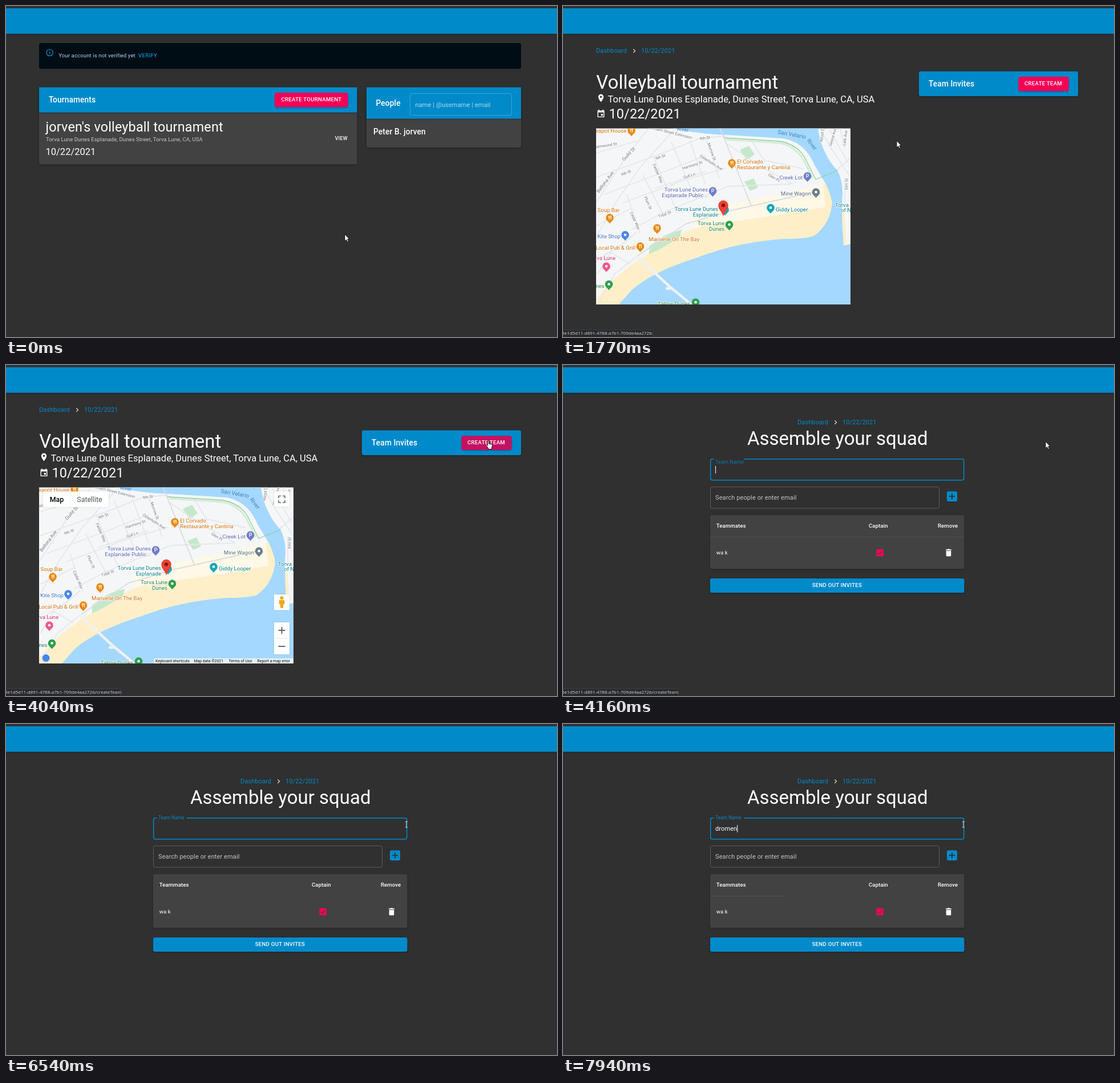
An HTML page for the animation above (8000 ms loop, 966 by 580 pixels).

```html
<!DOCTYPE html>
<html lang="en">
<head>
<meta charset="utf-8">
<title>Tournament team setup</title>
<style>
html, body { margin: 0; width: 100%; height: 100%; overflow: hidden; background: #303030; }
svg { display: block; font-family: Roboto, sans-serif; fill: #fff; }
.h3 { font-size: 33px; }
.h4 { font-size: 23.4px; letter-spacing: .007em; }
.h5 { font-size: 16.5px; }
.h6 { font-size: 13.75px; font-weight: 500; letter-spacing: .0075em; }
.b1 { font-size: 11px; letter-spacing: .0094em; }
.b2 { font-size: 9.625px; letter-spacing: .0107em; }
.btn { font-size: 9.625px; font-weight: 500; letter-spacing: .0286em; }
.th { font-size: 9.625px; font-weight: 500; letter-spacing: .01em; }
.blue { fill: #008aca; }
.pink { fill: #f50057; }
.paper { fill: #424242; }
.lift { filter: drop-shadow(0 1.5px 1.5px rgba(0,0,0,.32)); }
.soft { filter: drop-shadow(0 .5px 1px rgba(0,0,0,.15)); }
.line { fill: none; stroke: #5c5c5c; }
.tiny { font-size: 6.9px; fill: #111; }
#status text { font: 8px "Open Sans", "Noto Sans", sans-serif; fill: #d3d6da; }
#labels text { paint-order: stroke; stroke: #fff; stroke-width: 1.6px; stroke-linejoin: round; }
#labels .water { stroke: none; fill: #3f86b8; }
</style>
</head>
<body>
<svg width="966" height="580" viewBox="0 0 966 580">
  <defs>
    <clipPath id="frame"><rect x="58" y="214.5" width="446" height="308.5"/></clipPath>
    <path id="pin" d="M0 10.5C-1.5 7-6.8 5.5-6.8 0A6.8 6.8 0 0 1 6.8 0C6.8 5.5 1.5 7 0 10.5Z"/>
    <path id="chevron" d="M-1.7-3.2L1.6 0L-1.7 3.2" fill="none" stroke="#ddd" stroke-width="1.2"/>
  </defs>
  <rect width="966" height="580" fill="#303030"/>
  <rect class="blue lift" y="4" width="966" height="44.7"/>
  <rect width="966" height="4" fill="#323236"/>

  <g id="home">
    <rect x="58" y="65" width="845" height="45" rx="3" fill="#000d14"/>
    <circle cx="76.6" cy="81.7" r="5.7" fill="none" stroke="#1a8fdc" stroke-width="1.2"/>
    <path d="M76.6 78.2v1.4M76.6 80.8v4" stroke="#1a8fdc" stroke-width="1.3"/>
    <text class="b2" x="92.2" y="90" fill="#a6d5fa">Your account is not verified yet</text>
    <text class="btn blue" x="232" y="90">VERIFY</text>

    <rect class="paper lift" x="58" y="142.5" width="557.5" height="135" rx="3"/>
    <path class="blue lift" d="M58 186.5v-44h557.5v44z"/>
    <text class="h6" x="75" y="169">Tournaments</text>
    <rect class="pink lift" x="471" y="152" width="128.5" height="25" rx="3"/>
    <text class="btn" x="482.5" y="167">CREATE TOURNAMENT</text>
    <text class="h4" x="69.5" y="220">jorven's volleyball tournament</text>
    <text class="b2" x="70" y="236.5" fill="#c9c9c9" style="letter-spacing:.004em">Torva Lune Dunes Esplanade, Dunes Street, Torva Lune, CA, USA</text>
    <text class="h5" x="69.5" y="261">10/22/2021</text>
    <rect id="hover" x="565.5" y="221" width="44" height="21.5" rx="3" fill="#515151"/>
    <text class="btn" x="576.7" y="234.6" style="font-size:8.94px">VIEW</text>

    <rect class="paper lift" x="632" y="142.5" width="271" height="105.5" rx="3"/>
    <path class="blue lift" d="M632 197.5v-55h271v55z"/>
    <text class="h6" x="648.5" y="175">People</text>
    <rect class="line" x="708.5" y="153.5" width="178" height="38" rx="3" style="stroke:#3fa6d8"/>
    <text class="b1" x="717.5" y="176.5" fill="#b0d9ee">name | @username | email</text>
    <text class="h6" x="644" y="225">Peter B. jorven</text>
  </g>

  <g id="event">
    <text class="b1 blue" x="58" y="82">Dashboard</text>
    <use href="#chevron" x="125" y="78.7"/>
    <text class="b1 blue" x="137" y="82">10/22/2021</text>
    <text class="h3" x="58.3" y="145.3">Volleyball tournament</text>
    <path fill-rule="evenodd" d="M66.5 168.3C64.5 165.5 61.8 162.3 61.8 159.2a4.7 4.7 0 0 1 9.4 0C71.2 162.3 68.5 165.5 66.5 168.3ZM66.5 157.5a1.7 1.7 0 1 0 .01 0Z"/>
    <text class="h5" x="78.5" y="169.3">Torva Lune Dunes Esplanade, Dunes Street, Torva Lune, CA, USA</text>
    <path fill-rule="evenodd" d="M60.5 183h1.5v-1.6h1.5v1.6h6v-1.6h1.5v1.6h1.5v12h-12zM61.9 186.4v7.3h9.2v-7.3zM66.7 189h3.2v3.2h-3.2z"/>
    <text class="h4" x="80.5" y="196.8">10/22/2021</text>
    <rect class="blue lift" x="624" y="114.5" width="279" height="43.5" rx="3"/>
    <text class="h6" x="641" y="141">Team Invites</text>
    <rect id="create" class="lift" x="798.5" y="124" width="88" height="25" rx="3"/>
    <text class="btn" x="809" y="139.4">CREATE TEAM</text>

    <g clip-path="url(#frame)">
      <rect x="58" y="214" width="446" height="310" fill="#f5f6f7"/>
      <path fill="#feefc9" d="M58 516Q78 482 132 446L190 408Q225 386 290 378L455 352L452 315L474 300V410L100 523H58ZM489 360L494 366L497 419H489Z"/>
      <path fill="#fef8e7" d="M222 372L300 346L400 326L456 312L460 352L380 366L290 379L228 388Z"/>
      <path fill="#c5e8ca" d="M151 421L180 401L208 392L205 405L168 427L151 435ZM310 252L326 245L336 260L322 270ZM318 308L334 302L342 318L328 324Z"/>
      <path fill="#a5d8ff" d="M190 214Q240 225 290 226L385 232Q424 238 441 279L456 304Q466 318 472 344Q469 382 440 403Q424 408 389 408C340 411 290 420 235 441Q160 464 121 497L98 523H504V417L492 420Q487 360 490 330Q490 302 480 287C462 268 450 240 447 214Z"/>
      <g fill="none" stroke="#e4e7ed" stroke-width="1.8">
        <path d="M58 345L108 268L150 214M58 405L92 345L135 283L190 222M58 300Q150 268 240 232L285 228M72 330Q160 298 250 262M58 258L130 236M105 345L210 306L285 284M120 392L175 362L290 316L400 312M160 320L250 290M58 445Q105 420 130 395M58 385L120 355M62 523L90 470L130 438L215 382L300 357L440 326M112 330L135 398M140 296L178 370M158 262L196 352M190 238L225 322M222 236L250 312M250 230L274 302M275 214L286 240L330 350M285 240L345 280L402 312M330 235L352 270L420 285M60 470L84 432L118 452M480 287L504 266M450 214L472 252L504 300M466 214L500 275M486 214L494 250M494 300V350"/>
        <path stroke="#ced3dc" stroke-width="1" d="M130 438L215 382L300 357L440 326M275 214L286 240L330 350"/>
        <path stroke="#f0f1f3" stroke-width="4.5" d="M128 437L185 490L225 523M180 495h12"/>
        <path stroke="#d3ecd7" stroke-width="3" d="M286 234L380 240Q410 246 424 274L438 302"/>
        <path stroke="#8fd09d" stroke-width="1.3" d="M283 231L380 237Q415 243 428 274L443 304L482 288"/>
      </g>
      <g id="pins"></g>
      <g id="labels"></g>
      <path fill="#ea4335" d="M281 369C279.5 361 272.3 357.5 272.3 349.3a8.7 8.7 0 0 1 17.4 0C289.7 357.5 282.5 361 281 369Z"/>
      <circle cx="281" cy="349.2" r="3.2" fill="#8b1710"/>
      <g id="controls">
        <path class="soft" d="M65 221.5h115v27.5h-115zM470 221.5h27v27h-27zM470 402h27v27.5h-27zM470 451h27v56h-27z"/>
        <path d="M113 222v27" stroke="#eee"/>
        <text x="76.7" y="239.5" font-size="12.4" font-weight="500" fill="#000">Map</text>
        <text x="124.3" y="239.5" font-size="12.4" fill="#565656">Satellite</text>
        <path fill="none" stroke="#666" stroke-width="1.6" d="M478 233.5v-4h4M485 229.5h4v4M489 237v4h-4M482 241h-4v-4"/>
        <path stroke="#666" stroke-width="2" d="M477.5 465h12M483.5 459v12M477.5 493h12"/>
        <path d="M474 479h19" stroke="#e6e6e6"/>
        <circle cx="483.5" cy="408.3" r="3" fill="#f2a51f"/>
        <path fill="#f2a51f" d="M479 412h9l.5 7h-2l-.7 7h-4.6l-.7-7h-2z"/>
        <circle cx="70" cy="513.5" r="6.5" fill="#4285f4"/>
        <path fill="#f5f5f5" opacity=".8" d="M259 514h245v9H259z"/>
        <text class="tiny" x="262" y="520.5">Keyboard shortcuts</text>
        <text class="tiny" x="329.5" y="520.5">Map data ©2021</text>
        <text class="tiny" x="390.5" y="520.5">Terms of Use</text>
        <text class="tiny" x="440.5" y="520.5">Report a map error</text>
      </g>
    </g>
  </g>

  <g id="team">
    <text class="b1 blue" x="411" y="104">Dashboard</text>
    <use href="#chevron" x="478" y="100.5"/>
    <text class="b1 blue" x="490" y="104">10/22/2021</text>
    <text class="h3" x="323" y="140">Assemble your squad</text>
    <rect class="line" x="258.7" y="164.7" width="444" height="37" rx="3" style="stroke:#008aca;stroke-width:1.5"/>
    <path d="M264.5 162h52.5v5h-52.5z" fill="#303030"/>
    <text id="label" class="blue" x="267" letter-spacing=".1">Team Name</text>
    <text id="typed" class="b1" x="267" y="187"></text>
    <rect id="caret" y="177" width="1" height="13"/>
    <rect class="line" x="258.5" y="213.5" width="401" height="37.5" rx="3"/>
    <text class="b1" x="267" y="236" fill="#c3c3c3">Search people or enter email</text>
    <rect class="blue" x="673" y="221.5" width="18" height="17.5" rx="2"/>
    <path d="M677 230.2h10M682 225.2v10" stroke="#303030" stroke-width="1.9"/>
    <rect class="paper lift" x="258" y="263" width="445.5" height="94.3" rx="3"/>
    <rect id="divider" x="258" y="301" height="1" fill="#515151"/>
    <text class="th" x="268.7" y="284.5">Teammates</text>
    <text class="th" x="536" y="284.5">Captain</text>
    <text class="th" x="657" y="284.5">Remove</text>
    <text class="b2" x="268.7" y="332">wa k</text>
    <rect class="pink" x="549.5" y="322.8" width="12.5" height="12.5" rx="1.5"/>
    <path d="M552 329.2l2.6 2.6 5-5.2" fill="none" stroke="#424242" stroke-width="1.3"/>
    <path d="M671 323.2h2.7l.8-.9h3l.8.9h2.7v1.5h-10zM671.7 325.7h8.6v8.3q0 1.3-1.3 1.3h-6q-1.3 0-1.3-1.3z"/>
    <rect class="blue lift" x="258" y="374" width="445.5" height="25" rx="3"/>
    <text class="btn" x="436.7" y="388.7">SEND OUT INVITES</text>
  </g>

  <g id="status">
    <path id="statusBox" fill="#292a2d" stroke="#3d3e41"/>
    <text id="url" x="-2" y="576"></text>
  </g>
  <g id="cursor" stroke="#000" stroke-linejoin="round">
    <path id="arrow" stroke-width=".8" d="M0 0V12l2.7-2.5 1.9 4 1.9-.9-1.9-3.9H8Z"/>
    <path id="hand" stroke-width=".9" d="M-1.5-1.5q1.2-1.2 2.2.2V4l4.7 1q1.5.6 1.2 2.2L5.6 11v2.5H-.5V11.5L-4.5 7q-.4-1.6 1.3-1.3l1.7 1.5Z"/>
    <path id="beam" fill="none" stroke="#ddd" d="M-2-5H2M0-5V5M-2 5H2"/>
  </g>
</svg>
<script>
const LOOP = 8000;
const $ = id => document.getElementById(id);
const show = (id, on) => { $(id).style.display = on ? '' : 'none'; };
const set = (id, attrs) => { for (const k in attrs) $(id).setAttribute(k, attrs[k]); };

const pinColor = { food: '#e8890c', lot: '#6f7cc9', shop: '#4a86ea', sight: '#12a5b8', park: '#2f9e4f', grey: '#6b7f89', stay: '#f0588f' };
const textColor = { food: '#d06c08', lot: '#5661b5', shop: '#3b70d8', sight: '#087f8c', park: '#228043', grey: '#5a6e7a', stay: '#d8276b' };
const fork = '<path d="M-2-3.5v2.5q0 1 1 1v3.5M-.2-3.5v2.5q0 1-.8 1M2-3.5v7M2-3.5q-1.2 1.5 0 4" fill="none" stroke="#fff"/>';
const dot = '<circle r="2.3"/>';
const glyphs = { food: fork, lot: '<text y="3.2" font-size="9" font-weight="500" text-anchor="middle">P</text>' };
const pins = [
  [296, 275, 'food'], [82, 371, 'food'], [165, 389, 'food'], [135.5, 421, 'food'], [120, 218, 'food'],
  [262.5, 324, 'lot'], [428.5, 298, 'lot'], [109, 401, 'shop'], [443.5, 326, 'grey'], [364, 353.5, 'sight'],
  [284, 357, 'sight'], [291.5, 383, 'park'], [80.5, 487.5, 'park'], [232.5, 519, 'park'], [76, 456, 'stay']];
$('pins').innerHTML = pins.map(([x, y, kind]) =>
  `<g transform="translate(${x} ${y})"><use href="#pin" fill="${pinColor[kind]}"/>${glyphs[kind] || dot}</g>`).join('');

// text, x, y, kind, anchor
const places = [
  ['El Corvado', 305, 276, 'food'], ['Restaurante y Cantina', 305, 286, 'food'],
  ['Creek Lot', 420, 303.5, 'lot', 'end'], ['Mine Wagon', 435, 331.5, 'grey', 'end'],
  ['Torva Lune Dunes', 254, 325, 'lot', 'end'], ['Esplanade Public...', 254, 334.5, 'lot', 'end'],
  ['Torva Lune Dunes', 272, 359, 'sight', 'end'], ['Esplanade', 272, 368.5, 'sight', 'end'],
  ['Giddy Looper', 373, 359.5, 'sight'], ['Torva Lune', 283, 384, 'park', 'end'], ['Dunes', 283, 394, 'park', 'end'],
  ['Soup Bar', 60.5, 360.5, 'food'], ['Kite Shop', 101, 407, 'shop', 'end'], ['Marivelle On The Bay', 150, 412, 'food'],
  ['Local Pub &amp; Grill', 127, 427, 'food', 'end'], ['Torva Lune', 92, 445, 'stay', 'end'],
  ['Dunes', 72.5, 493.5, 'park', 'end'], ['Tallow Dunes', 223, 525, 'park', 'end'],
  ['Teapot House', 111, 222, 'food', 'end'], ['Torva', 477, 351.5, 'sight'], ['of Nature', 487, 361, 'sight']];
// text, x, y, angle, size
const streets = [
  ['Guild St', 107, 272, -47, 8.5], ['Bellona Ave', 63, 328, -53, 8.5], ['9th St', 163, 270, -20, 7], ['9th St', 103, 298, -22, 7],
  ['9th St', 240, 235, -8, 7], ['Harmony St', 210, 287, -18, 7], ['Gull Ln', 212, 303, -18, 7], ['Fielder Way', 157, 278, 66, 7],
  ['Morrow St', 253, 241, 70, 7], ['Osterholm Ave', 239, 264, 32, 7], ['Glen Pl', 359, 297, 32, 7], ['Plum St', 142, 335, 66, 7],
  ['Tidal St', 168, 371, -20, 7], ['Cedar Way', 117, 362, 65, 7], ['Palmwood St', 54, 250, -9, 7], ['Cedarn Street Extension', 153, 215, 14, 7],
  ['Alcot Dr', 455, 238, -82, 7.5], ['Vesna Ave', 471, 246, -75, 7], ['Lark Ave', 495, 245, -82, 7], ['Elm St', 499, 322, -88, 7]];
const rivers = [['San Velario', 376, 224, 10, 10], ['River', 427, 236, 52, 10], ['River', 200, 218, 8, 9]];
const slanted = (list, cls) => list.map(([s, x, y, angle, size]) =>
  `<text class="${cls}" transform="translate(${x} ${y}) rotate(${angle})" fill="#68717c" font-size="${size}">${s}</text>`).join('');
$('labels').innerHTML = slanted(streets, 'street') + slanted(rivers, 'water') + places.map(([s, x, y, kind, anchor = 'start']) =>
  `<text x="${x}" y="${y}" fill="${textColor[kind]}" font-size="9.6" text-anchor="${anchor}">${s}</text>`).join('');

// Progress in n discrete eased steps, the first at a and the last at b
const steps = (t, a, b, n) => {
  const k = t < a ? 0 : Math.min(n, Math.floor((t - a) / (b - a) * (n - 1) + 1e-6) + 1);
  const p = k / n;
  return p * p * (3 - 2 * p);
};
const moves = [[500, 1340, 7, 585, 236], [2590, 3610, 9, 846, 134], [4310, 5000, 6, 702, 176]];
const keys = [6700, 6860, 7030, 7360, 7790, 7940];
const blinks = [4160, 4700, 5150, 5550, 6110, 6540, 6700];
const link = '5e1d5d11-d891-4788-a7b1-709de4aa272b';

function draw() {
  const t = performance.now() % LOOP;
  const home = t < 1770, team = t >= 4160;
  show('home', home);
  show('event', !home && !team);
  show('team', team);
  show('hover', t >= 1620);
  show('controls', t >= 2130);
  set('create', { fill: t >= 3480 ? '#c51162' : '#f50057' });

  const longLink = t >= 3480;
  show('status', t >= 1200 && t < 2280 || longLink && t < 4720);
  set('statusBox', { d: `M-1 567.5H${longLink ? 201.5 : 157.5}V581H-1Z` });
  $('url').textContent = link + (longLink ? '/createTeam' : '');

  const floating = t < 4310;
  set('label', { y: floating ? 172.7 : 166.7, 'font-size': floating ? 9.05 : 8.25, opacity: floating ? .8 : 1 });
  set('divider', { width: floating ? 445.5 : t < 6700 ? 0 : 133.5 });
  $('typed').textContent = 'dromen'.slice(0, keys.filter(k => t >= k).length);
  set('caret', { x: 267 + $('typed').getComputedTextLength() });
  show('caret', blinks.filter(b => t >= b).length % 2);

  let x = 594, y = 400;
  for (const [a, b, n, toX, toY] of moves) {
    const p = steps(t, a, b, n);
    x += (toX - x) * p;
    y += (toY - y) * p;
  }
  const hand = t >= 1200 && t < 1620 || t >= 3480 && t < 4160;
  const beam = t >= 4862;
  show('hand', hand);
  show('beam', beam);
  show('arrow', !hand && !beam);
  set('cursor', { transform: `translate(${x} ${y})` });
  requestAnimationFrame(draw);
}
draw();
</script>
</body>
</html>
```
